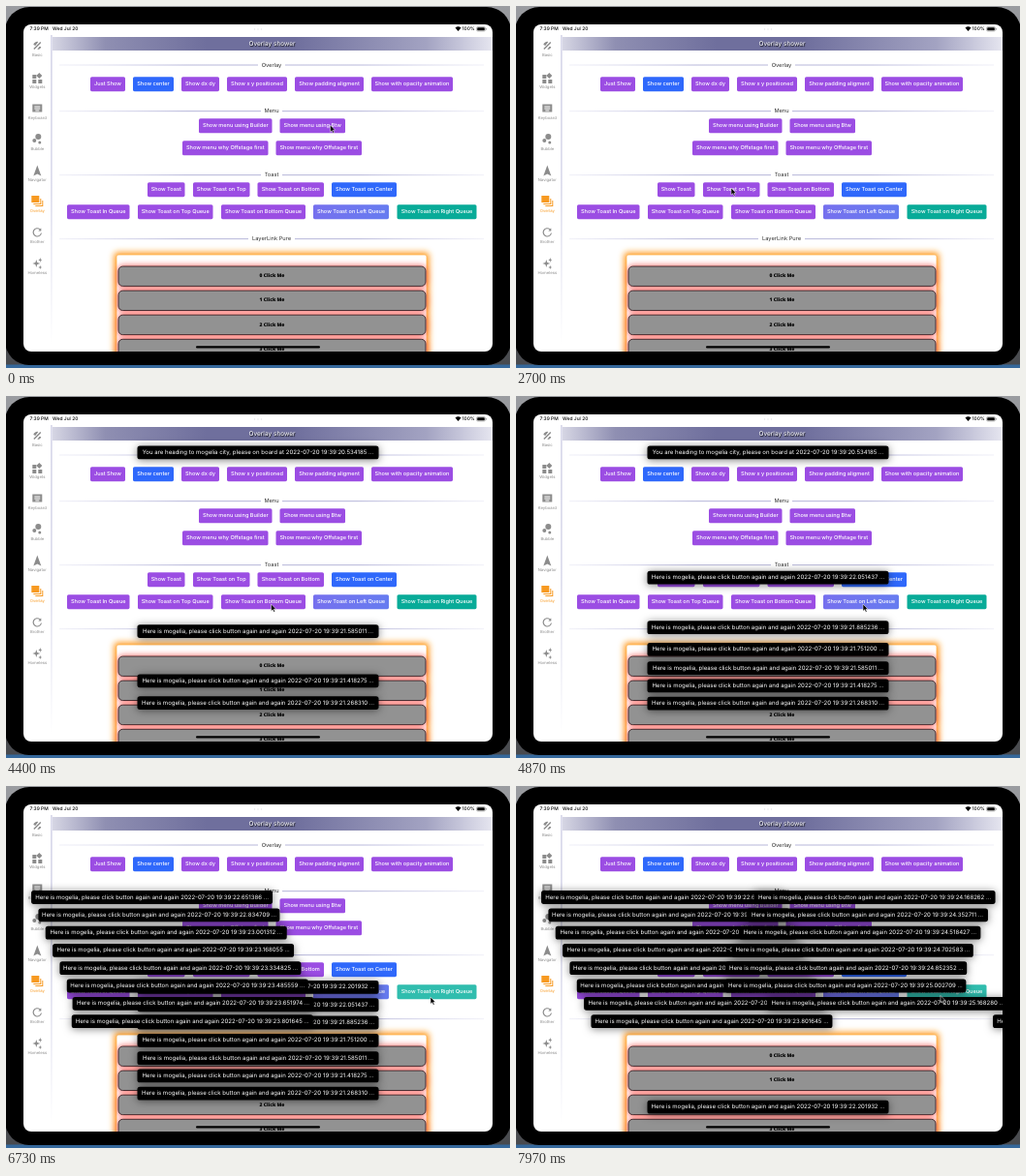
An HTML page for the animation above (8000 ms loop, 520 by 374 pixels).

```html
<!DOCTYPE html>
<html lang="en">
<head>
<meta charset="utf-8">
<title>Overlay shower</title>
<style>
html, body { margin: 0; width: 100%; height: 100%; overflow: hidden; background: #000; }
svg { display: block; width: 520px; height: 374px; }
text { font-family: Inter, "Open Sans", sans-serif; font-size: 5.7px; text-anchor: middle; dominant-baseline: central; text-rendering: geometricPrecision; }
.btn text { fill: #fff; font-weight: 500; font-size: 5.6px; }
.title { fill: #333; }
.side text { font-size: 4.2px; fill: #8a8a8a; }
.side .on text { fill: #f79a22; }
.item text { font-family: "Liberation Sans Narrow", "Open Sans", sans-serif; font-stretch: 75%; font-weight: 800; font-size: 5px; }
.status text { font-size: 4.9px; font-weight: 500; text-anchor: start; }
.toast text { font-size: 6.05px; fill: #fff; white-space: pre; }
.toast rect { filter: drop-shadow(0 1px 4px rgba(0,0,0,.5)); }
.menu text { font-size: 4.6px; fill: #fff; }
</style>
</head>
<body>
<svg viewBox="0 0 520 374" xmlns="http://www.w3.org/2000/svg">
  <defs>
    <clipPath id="screen"><rect x="18" y="19" width="484" height="338" rx="8"/></clipPath>
    <linearGradient id="desk" x2="0" y2="1"><stop stop-color="#9a9ca0"/><stop offset=".5" stop-color="#6a6b6e"/><stop offset="1" stop-color="#47494d"/></linearGradient>
    <linearGradient id="head" gradientUnits="userSpaceOnUse" x1="48" x2="502" y1="0" y2="0">
      <stop stop-color="#d6d6e4"/><stop offset=".12" stop-color="#8f8fb2"/><stop offset=".35" stop-color="#6f6f9d"/>
      <stop offset=".55" stop-color="#6f6f9d"/><stop offset=".85" stop-color="#a3a3c2"/><stop offset="1" stop-color="#e6e6f0"/>
    </linearGradient>
    <linearGradient id="rule" gradientUnits="userSpaceOnUse" x1="55" x2="493" y1="0" y2="0">
      <stop stop-color="#b4b4dc" stop-opacity=".25"/><stop offset=".3" stop-color="#a4a4d0"/><stop offset=".7" stop-color="#a4a4d0"/><stop offset="1" stop-color="#b4b4dc" stop-opacity=".25"/>
    </linearGradient>
    <linearGradient id="edge" gradientUnits="userSpaceOnUse" x1="0" x2="0" y1="30" y2="350">
      <stop stop-color="#b4b4d6"/><stop offset=".5" stop-color="#bdbddc"/><stop offset="1" stop-color="#fff"/>
    </linearGradient>
    <linearGradient id="mix"><stop stop-color="#7670ee"/><stop offset="1" stop-color="#677cf0"/></linearGradient>
    <filter id="blur3" x="-20%" y="-60%" width="140%" height="220%"><feGaussianBlur stdDeviation="3"/></filter>
    <filter id="blur5" x="-30%" y="-40%" width="160%" height="180%"><feGaussianBlur stdDeviation="5"/></filter>
  </defs>
  <rect width="520" height="374" fill="url(#desk)"/>
  <rect y="370.5" width="520" height="3.5" fill="#35689b"/>
  <rect x="-1" y="1" width="522" height="370" rx="25" fill="#000"/>
  <g clip-path="url(#screen)">
    <rect x="18" y="19" width="484" height="338" fill="#fff"/>
    <g id="page"></g>
    <g id="menu" class="menu"></g>
    <g id="toasts"></g>
    <g fill="#e2e2e5"><circle cx="256.5" cy="24" r=".7"/><circle cx="260" cy="24" r=".7"/><circle cx="263.5" cy="24" r=".7"/></g>
    <rect x="196" y="351.3" width="128" height="2.2" rx="1.1" fill="#000"/>
  </g>
  <path id="cursor" d="M0 0V7.2L1.7 5.7 2.9 8.3 4.1 7.8 2.9 5.2H5.1Z" fill="#000" stroke="#fff" stroke-width=".5"/>
</svg>
<script>
const LOOP = 8000;
const $ = id => document.getElementById(id);
const clamp = v => Math.max(0, Math.min(1, v));
const label = (x, y, s, attrs = '') => `<text x="${x}" y="${y}" ${attrs}>${s}</text>`;
const box = (x, y, w, h, r, attrs) => `<rect x="${x}" y="${y}" width="${w}" height="${h}" rx="${r}" ${attrs}/>`;

// Static page
const PURPLE = '#9b4de3', BLUE = '#2f68fb', TEAL = '#08ab98';

function button(y, [x0, x1, text, fill = PURPLE, id = '']) {
  return `<g class="btn">${box(x0, y, x1 - x0, 15, 1.6, `fill="${fill}" id="${id}"`)}${label((x0 + x1) / 2, y + 7.5, text)}</g>`;
}

const rows = [
  [73.2, [87, 123, 'Just Show'], [131, 173, 'Show center', BLUE], [181, 220, 'Show dx dy'], [228, 290, 'Show x y positioned'],
    [298, 369, 'Show padding aligment'], [377, 461, 'Show with opacity animation']],
  [116.3, [199, 274.5, 'Show menu using Builder'], [282.5, 350, 'Show menu using Btw']],
  [139.3, [182, 270.5, 'Show menu why Offstage first'], [278.5, 367, 'Show menu why Offstage first']],
  [182.2, [146, 184.5, 'Show Toast'], [193, 251.5, 'Show Toast on Top'], [259.5, 328, 'Show Toast on Bottom'], [336, 403, 'Show Toast on Center', BLUE]],
  [205.2, [63, 127.5, 'Show Toast In Queue'], [136, 213.5, 'Show Toast on Top Queue'], [222, 309, 'Show Toast on Bottom Queue'],
    [317, 395, 'Show Toast on Left Queue', 'url(#mix)'], [403.5, 485.5, 'Show Toast on Right Queue', TEAL, 'rightBtn']]
];

function section(y, text, half) {
  const line = (a, b) => box(a, y - .4, b - a, .8, 0, 'fill="url(#rule)"');
  return line(55, 274 - half) + line(274 + half, 493) + label(274, y, text, 'class="title"');
}

const nav = [
  ['Basic', 41, 51, 'M-4 3L3-4 4-3-3 4ZM-4-1A4 4 0 0 1 1-4L-2 0ZM4 1A4 4 0 0 1 0 4L2 1Z'],
  ['Widgets', 75, 84, 'M-5-4H-1V0H-5ZM2-6L5-3 2 0-1-3ZM-5 1H-1V5H-5ZM1 1H5V5H1Z'],
  ['Keyboard', 105.5, 116, 'M-5-4H5V4H-5ZM-3-2V-1H3V-2ZM-3 0V1H3V0ZM-2 2V3H2V2Z'],
  ['Bubble', 138, 148, 'M-5 1A2 2 0 0 1-1 1A2 2 0 0 1-5 1ZM-2-3A3 3 0 0 1 4-3A3 3 0 0 1-2-3ZM1 3A1 1 0 0 1 4 3A1 1 0 0 1 1 3Z'],
  ['Navigator', 170.5, 180, 'M0-6L4 5 0 3-4 5Z'],
  ['Overlay', 202, 212, 'M-6-6H2V1H-6ZM3-3H4V3H-4V2H3ZM5-1H6V5H-2V4H5Z'],
  ['Brother', 233.5, 244, 'M4-4V-1H1L2.4-2.4A3.6 3.6 0 1 0 3.6 1H4.6A4.7 4.7 0 1 1 3-3.2Z'],
  ['Homeless', 266, 276, 'M-1-4L0-1 3 0 0 1-1 4-2 1-5 0-2-1ZM3-6L3.6-4.2 5-3.5 3.6-3 3-1 2.4-3 1-3.5 2.4-4.2ZM3 2L3.6 3.4 5 4 3.6 4.6 3 6 2.4 4.6 1 4 2.4 3.4Z']
];

function sidebar() {
  return nav.map(([text, iconY, textY, d]) => {
    const on = text === 'Overlay';
    return `<g class="${on ? 'on' : ''}"><path transform="translate(32.3 ${iconY})" d="${d}" fill-rule="evenodd" fill="${on ? '#f79a22' : '#8c8c8c'}"/>${label(32.3, textY, text)}</g>`;
  }).join('');
}

function list() {
  const tops = [0, 1, 2, 3].map(i => 269 + 25.1 * i);
  const glow = y => box(115, y - 1, 319, 23, 6, 'fill="#ff4a42" opacity=".8" filter="url(#blur3)"');
  const item = (y, i) => `<g class="item">${box(116, y, 317, 20.4, 4.5, 'fill="#929292" stroke="#3a2327" stroke-width=".9"')}${label(274.5, y + 10.3, i + ' Click Me')}</g>`;
  return box(112.5, 255.5, 323, 120, 3, 'fill="#ff9a1f" stroke="#ff9a1f" stroke-width="2" filter="url(#blur3)"')
    + box(114, 257, 320, 120, 2, 'fill="#fff" stroke="#ffb75a" stroke-width=".8"')
    + tops.map(glow).join('') + tops.map(item).join('');
}

const status = `<g class="status">${label(24.5, 23.7, '7:39 PM')}${label(48, 23.7, 'Wed Jul 20')}${label(470.5, 23.7, '100%')}
  <path d="M463.5 22.6Q466.5 20 469.5 22.6L466.5 26Z"/>
  ${box(485.5, 21.6, 9, 4.4, 1.3, 'fill="none" stroke="#777" stroke-width=".5"')}${box(486.2, 22.3, 7.6, 3, .7, '')}${box(495, 23, .8, 1.6, .4, 'fill="#777"')}</g>`;

$('page').innerHTML = status
  + box(46.5, 30, .9, 320, 0, 'fill="url(#edge)"')
  + box(48, 32, 454, 14, 0, 'fill="url(#head)"')
  + label(274.5, 39.2, 'Overlay shower', 'style="font-size:6.5px;fill:#fff;text-shadow:.6px .8px 1px #000"')
  + section(61, 'Overlay', 14) + section(108.7, 'Menu', 11) + section(174.7, 'Toast', 11) + section(240.7, 'LayerLink Pure', 24)
  + rows.map(([y, ...items]) => items.map(b => button(y, b)).join('')).join('')
  + list() + `<g class="side">${sidebar()}</g>`;

// Popup menu
const cells = [
  ['Print', 'M-3-5H3V-3H-3ZM-5-2H5V3H3V1H-3V3H-5ZM-2 2H2V5H-2Z'],
  ['Home', 'M0-5L6 0H4V5H1V1H-1V5H-4V0H-6Z'],
  ['Mail', 'M-5-4H5V4H-5ZM-4-3V-2L0 1 4-2V-3L0 0Z'],
  ['QRCode', 'M-5-5H-.5V-.5H-5ZM-4-4V-1.5H-1.5V-4ZM.5-5H5V-.5H.5ZM1.5-4V-1.5H4V-4ZM-5 .5H-.5V5H-5ZM-4 1.5V4H-1.5V1.5ZM1 1H3V3H1ZM3 3H5V5H3Z'],
  ['Settings', 'M-1-5H1L1.5-3.4 3-2.6 4.4-3 5.2-1.4 4 0 5.2 1.4 4.4 3 3 2.6 1.5 3.4 1 5H-1L-1.5 3.4-3 2.6-4.4 3-5.2 1.4-4 0-5.2-1.4-4.4-3-3-2.6-1.5-3.4ZM-1.8 0A1.8 1.8 0 0 0 1.8 0A1.8 1.8 0 0 0-1.8 0Z'],
  ['More', 'M-5-3.6H5V-2.4H-5ZM-5-.6H5V.6H-5ZM-5 2.4H5V3.6H-5Z']
];
$('menu').innerHTML = box(266, 137, 101, 68, 6, 'fill="#ff1f55" stroke="#ff1f55" stroke-width="5" opacity=".75" filter="url(#blur5)"')
  + '<path d="M311 139.500L316 135 321 139.500Z"/>' + box(267.3, 138.5, 98.4, 65.6, 4, '')
  + '<path d="M300 138.500V204M333 138.500V204M267.300 171.300H365.700" stroke="#555" stroke-width=".5"/>'
  + cells.map(([text, d], i) => {
    const x = 283.5 + 32.7 * (i % 3), y = i < 3 ? 152 : 184.7;
    return `<path transform="translate(${x} ${y})" d="${d}" fill="#fff" fill-rule="evenodd"/>${label(x, y + 11.2, text)}`;
  }).join('');

// Toasts
const HERE = 'Here is mogelia, please click button again and again';
const W = 249, CENTER = 135.5, STEP = 18.3, LIFE = 3020;
const toasts = [];

function addToast(text, start, pose) {
  const g = document.createElementNS('http://www.w3.org/2000/svg', 'g');
  g.setAttribute('class', 'toast');
  g.innerHTML = box(0, -6.9, W, 13.8, 2.6, 'fill="#000"') + label(W / 2, 0, text);
  $('toasts').append(g);
  toasts.push({ g, start, pose });
}

// Stamps are seconds after 19:39; the rate maps them onto playback time.
function addQueue(stamps, first, rate, pose) {
  stamps.forEach((s, i) => addToast(`${HERE} 2022-07-20 19:39:${s} ...`, first + (s - stamps[0]) * rate, age => pose(age, i)));
}

const settle = age => 1 - Math.pow(2, -10 * clamp(age / 600));
const slide = (from, to, age) => from + (to - from) * settle(age);

addToast('You are heading to mogelia city, please on board at 2022-07-20 19:39:20.534185 ...', 3200,
  age => ({ x: CENTER, y: 58.4, alpha: clamp(age / 200) * clamp((LIFE + 200 - age) / 200) }));

addQueue(['21.268310', '21.418275', '21.585011', '21.751200', '21.885236', '22.051437', '22.201932'], 3886, 1045, (age, i) => {
  const rest = 318 - STEP * i;
  const y = age < LIFE ? slide(-40, rest, age) : slide(rest, 400, age - LIFE);
  return { x: CENTER, y };
});
addQueue(['22.651386', '22.834709', '23.001312', '23.168055', '23.334825', '23.485559', '23.651974', '23.801645'], 5317, 950,
  (age, i) => ({ x: slide(-335, 26.4 + 7.35 * i, age), y: 115 + STEP * i }));
addQueue(['24.168262', '24.352711', '24.518427', '24.702583', '24.852352', '25.002709', '25.168280', '25.302416'], 6800, 1030,
  (age, i) => ({ x: slide(502, 245.3 - 7.6 * i, age), y: 115 + STEP * i }));

// Pointer stops: time, x, y
const path = [
  [0, 334.5, 123], [300, 334.5, 123], [700, 345.5, 111], [1900, 345.5, 111], [2700, 222, 188], [3150, 222, 188], [3600, 273.5, 215],
  [4550, 273.5, 215], [4850, 358, 215], [5900, 363.5, 215.5], [6250, 363.5, 215.5], [6600, 438, 218], [7400, 438, 217], [LOOP, 438, 216.5]
];

function pointer(t) {
  const i = path.findIndex((p, k) => k && t <= p[0]);
  const [t0, x0, y0] = path[i - 1], [t1, x1, y1] = path[i];
  const u = (t - t0) / (t1 - t0), e = u * u * (3 - 2 * u);
  return [x0 + (x1 - x0) * e, y0 + (y1 - y0) * e];
}

function render(t) {
  $('menu').setAttribute('opacity', clamp((t - 450) / 200) * clamp((2200 - t) / 200));
  $('cursor').setAttribute('transform', `translate(${pointer(t).join(' ')})`);
  $('rightBtn').setAttribute('fill', t > 6550 ? '#30bdae' : TEAL);
  for (const { g, start, pose } of toasts) {
    const age = t - start;
    const { x, y, alpha = 1 } = pose(age);
    const shown = age >= 0 && alpha > 0 && y < 385;
    g.setAttribute('display', shown ? 'inline' : 'none');
    if (!shown) continue;
    g.setAttribute('transform', `translate(${x.toFixed(2)} ${y.toFixed(2)})`);
    g.setAttribute('opacity', alpha);
  }
}

const begin = performance.now();
function tick() {
  render((performance.now() - begin) % LOOP);
  requestAnimationFrame(tick);
}
tick();
</script>
</body>
</html>
```
